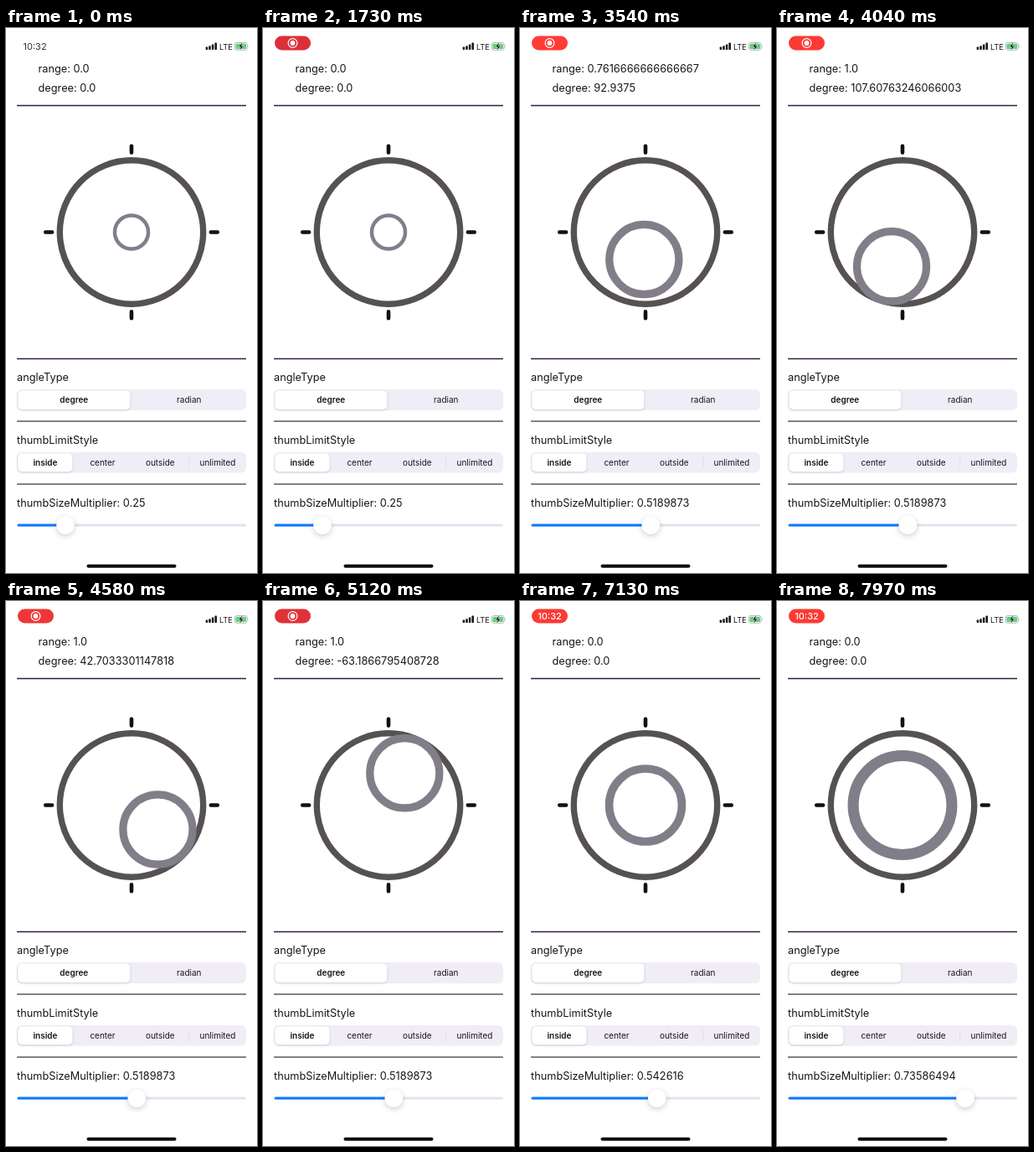
An HTML page that plays this animation: 300x650 px, repeating every 7.99 s.

```html
<!DOCTYPE html>
<html lang="en">
<head>
<meta charset="utf-8">
<title>Joystick settings</title>
<style>
html, body { margin: 0; width: 100%; height: 100%; overflow: hidden; background: #fff; }
svg { display: block; width: 100%; height: 100%; }
text { font: 12.75px Inter, "Liberation Sans", sans-serif; fill: #171519; white-space: pre; }
.seg { font-size: 10px; text-anchor: middle; }
.on { font-weight: 600; }
.clock { font-size: 11px; }
.lift { filter: drop-shadow(0 1px 1.5px rgba(50, 40, 80, .2)); }
.knob { filter: drop-shadow(0 2px 3px rgba(50, 40, 80, .24)); }
</style>
</head>
<body>
<svg viewBox="0 0 300 650" preserveAspectRatio="none">
  <text id="time" class="clock" x="20.5" y="26" style="fill:#333136">10:32</text>
  <g id="pill">
    <rect id="pillBg" x="14" y="9.5" width="43" height="17" rx="8.5"/>
    <text id="pillTime" class="clock" x="35.5" y="22" text-anchor="middle" style="fill:#fff;font-weight:500">10:32</text>
    <g id="rec" fill="none" stroke="#fff" stroke-width="1.2">
      <circle cx="35.5" cy="18" r="5.4"/>
      <circle cx="35.5" cy="18" r="2.9" fill="#fff" stroke="none"/>
    </g>
  </g>

  <g fill="#171519">
    <rect x="238.7" y="22.6" width="2.5" height="3.4" rx=".7"/>
    <rect x="242.3" y="21.2" width="2.5" height="4.8" rx=".7"/>
    <rect x="245.9" y="19.4" width="2.5" height="6.6" rx=".7"/>
    <rect x="249.5" y="17.6" width="2.5" height="8.4" rx=".7"/>
  </g>
  <text x="255" y="25.6" style="font-size:9.3px">LTE</text>
  <rect x="273.3" y="17.5" width="15" height="8.8" rx="2.6" fill="#fff" stroke="#a5a2a8" stroke-width=".8"/>
  <rect x="274.5" y="18.7" width="12.6" height="6.4" rx="1.6" fill="#5bd27a"/>
  <path d="M289.3 20.4q1.2 1.5 0 3z" fill="#a5a2a8"/>
  <path d="M282.8 16.6l-5.1 6h2.7l-1.4 4.7 5.1-6h-2.7z" fill="#111" stroke="#fff" stroke-width=".5"/>

  <text id="range" x="38.5" y="53"></text>
  <text id="degree" x="38.5" y="75.7"></text>

  <g stroke-width="1.5">
    <path d="M13 92.5H287" stroke="#2a2049"/>
    <path d="M13 394.5H287" stroke="#371b42"/>
    <path d="M13 469H287M13 544H287" stroke="#5a5766"/>
  </g>

  <path d="M150 140.7V148.6M150 338.3V346.2M47.2 243.5H55.1M244.9 243.5H252.8"
    stroke="#111" stroke-width="4.6" stroke-linecap="round"/>
  <circle cx="150" cy="243.5" r="85.7" fill="none" stroke="#565152" stroke-width="7.4"/>
  <circle id="thumb" fill="none" stroke="#817e89"/>

  <text x="13" y="421">angleType</text>
  <rect x="13" y="431" width="274" height="25" rx="6" fill="#f1edf7"/>
  <rect class="lift" x="14.3" y="432.3" width="134" height="22.6" rx="5" fill="#fff"/>
  <text class="seg on" x="81.3" y="447">degree</text>
  <text class="seg" x="218.8" y="447">radian</text>

  <text x="13" y="495.7">thumbLimitStyle</text>
  <rect x="13" y="506" width="274" height="24.5" rx="6" fill="#f1edf7"/>
  <rect class="lift" x="14.3" y="507.2" width="65.2" height="22" rx="5" fill="#fff"/>
  <path d="M178.2 511.5V525M218.7 511.5V525" stroke="#dcd7e4" stroke-width=".8"/>
  <text class="seg on" x="47" y="522">inside</text>
  <text class="seg" x="115.5" y="522">center</text>
  <text class="seg" x="184.3" y="522">outside</text>
  <text class="seg" x="253" y="522">unlimited</text>

  <text id="size" x="13" y="570.5"></text>
  <rect x="13.5" y="591.5" width="273.5" height="3" rx="1.5" fill="#e5e2ee"/>
  <rect id="fill" x="13.5" y="591.5" height="3" rx="1.5" fill="#0a7aff"/>
  <circle id="knob" class="knob" cy="593" r="10.8" fill="#fff"/>
  <rect x="96.5" y="639.7" width="107" height="4" rx="2" fill="#0b0b0d"/>
</svg>
<script>
const LOOP = 7990, STEP = 20;
const CX = 150, CY = 243.5, RADIUS = 89;
const RELEASE = 6260, RETURN = 220;

// [ms, value], linear between
const sizeKeys = [
  [1880, .25], [2050, .28], [2400, .39], [2740, .478481], [2980, .5189873],
  [6990, .5189873], [7160, .55], [7500, .645], [7780, .718], [7940, .73586494]
];
const angleKeys = [
  [3320, 84], [3640, 97], [4040, 107.60763246066003], [4140, 107.60763246066003],
  [4400, 78], [5120, -63.1866795408728], [5960, -231.95082833994405], [6140, -241.2073914628]
];
const reachKeys = [[3320, 0], [3440, .37], [3560, .84], [3640, 1]];
const pillKeys = [[200, 0], [520, 1]];
const recKeys = [[1600, 0], [1720, 1], [6650, 1], [6770, 0]];

const el = {};
document.querySelectorAll('[id]').forEach(e => el[e.id] = e);

function at(keys, t) {
  if (t <= keys[0][0]) return keys[0][1];
  for (let i = 1; i < keys.length; i++) {
    const [t0, a] = keys[i - 1], [t1, b] = keys[i];
    if (t === t1) return b;
    if (t < t1) return a + (b - a) * (t - t0) / (t1 - t0);
  }
  return keys[keys.length - 1][1];
}

// The slider moves in fixed increments except at its resting values
function sliderValue(t) {
  const v = at(sizeKeys, t);
  return sizeKeys.some(k => k[1] === v) ? v : Math.round(v * 1185) / 1185;
}

function floatText(v) {
  const f = Math.fround(v);
  for (let p = 6; p < 10; p++) {
    const n = Number(f.toPrecision(p));
    if (Math.fround(n) === f) return String(n);
  }
}

const doubleText = v => Number.isInteger(v) ? v + '.0' : String(v);
const wrap = a => a <= -180 ? a + 360 : a;

function set(e, attrs) {
  for (const k in attrs) e.setAttribute(k, attrs[k]);
}

function drawStatus(t) {
  const shown = at(pillKeys, t), rec = at(recKeys, t);
  const dark = (1 + Math.cos((t - 1600) / 4000 * 2 * Math.PI)) / 2;
  const mix = (a, b) => Math.round(a + (b - a) * dark);
  el.time.style.opacity = 1 - shown;
  el.pill.style.opacity = shown;
  el.pillTime.style.opacity = 1 - rec;
  el.rec.style.opacity = rec;
  set(el.pillBg, { fill: `rgb(${mix(255, 219)},${mix(59, 48)},${mix(52, 58)})` });
}

function drawJoystick(t, size) {
  const held = t > 3320 && t < RELEASE;
  const angle = at(angleKeys, t);
  const back = Math.min(1, Math.max(0, (t - RELEASE) / RETURN));
  const reach = at(reachKeys, t) * (1 - back) ** 2;
  const r = size * RADIUS, dist = reach * (RADIUS - r), rad = angle * Math.PI / 180;
  set(el.thumb, {
    cx: CX + dist * Math.cos(rad),
    cy: CY + dist * Math.sin(rad),
    r: r * .9,
    'stroke-width': r * .2
  });
  el.range.textContent = 'range: ' + doubleText(held ? reach : 0);
  el.degree.textContent = 'degree: ' + doubleText(held ? wrap(angle) : 0);
}

function drawSlider(size) {
  const x = 71 + (size - .25) * 317;
  set(el.knob, { cx: x });
  set(el.fill, { width: x - 13.5 });
  el.size.textContent = 'thumbSizeMultiplier: ' + floatText(size);
}

function draw(ms) {
  const t = Math.floor(ms % LOOP / STEP) * STEP;
  const size = sliderValue(t);
  drawStatus(t);
  drawJoystick(t, size);
  drawSlider(size);
}

const start = performance.now();
function tick() {
  draw(performance.now() - start);
  requestAnimationFrame(tick);
}
tick();
</script>
</body>
</html>
```
